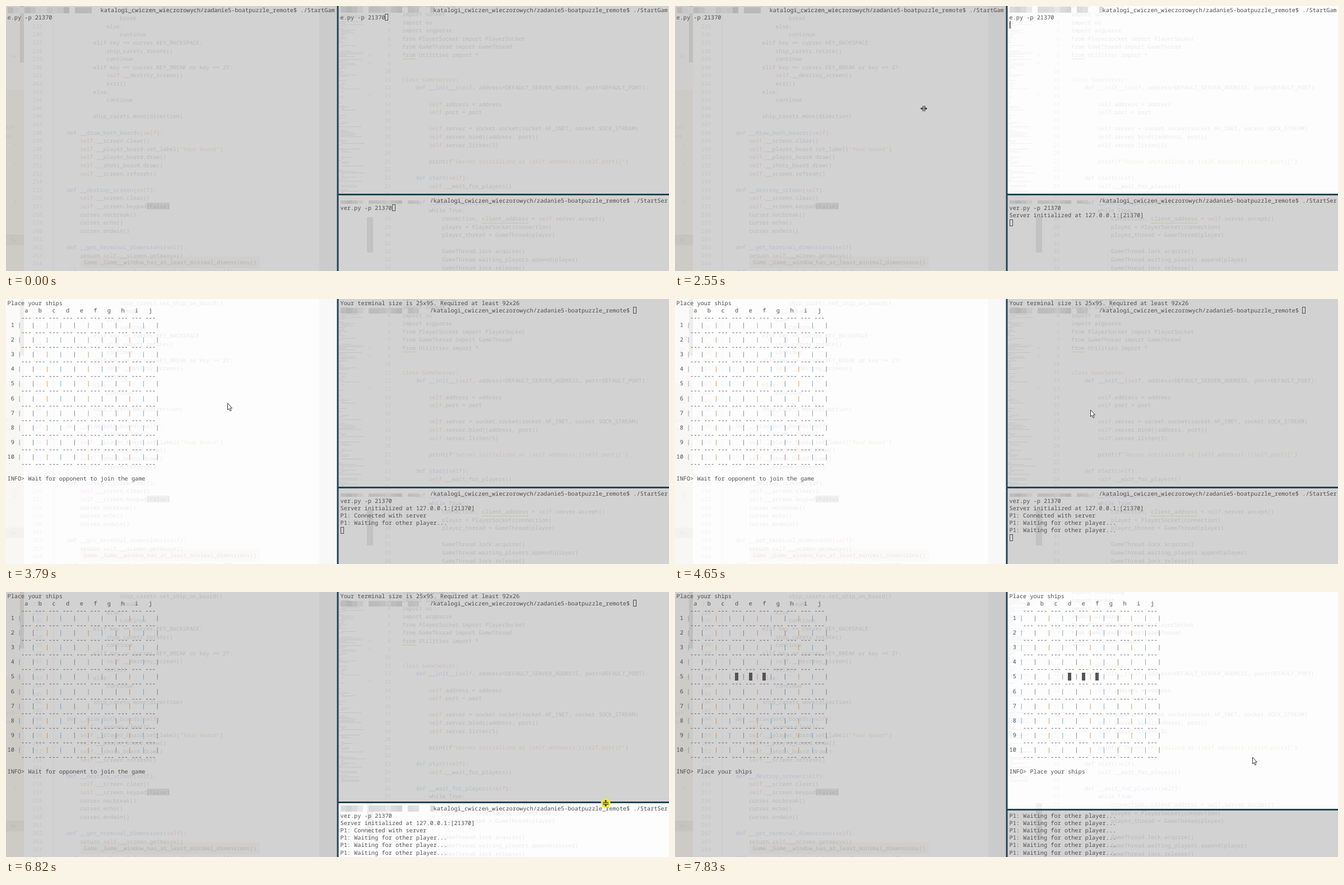
An HTML page with a canvas that plays this animation: 1183x473 px, repeating every 8000 ms.

```html
<!DOCTYPE html>
<html lang="en">
<head>
<meta charset="utf-8">
<title>Terminal game session</title>
<style>
  html, body { margin: 0; width: 100%; height: 100%; overflow: hidden; background: #d2d2d2; }
  canvas { display: block; }
</style>
</head>
<body>
<canvas id="stage" width="1183" height="473"></canvas>
<script>
const ctx = document.getElementById('stage').getContext('2d');
const W = 1183, H = 473, LOOP = 8000;
const COL = 6.15, ROW = 13.08, LEFT = 2.5, RIGHT = 596.5;
const CODE_COL = 5.94, CODE_ROW = 14.6;
const FONT = "px 'Noto Sans Mono', 'DejaVu Sans Mono', monospace";
const INK = '#4e4e4e', DIVIDER = '#1f4555';
const PATH = 'katalogi_cwiczen_wieczorowych/zadanie5-boatpuzzle_remote$ ';
const TAIL = 'e.py -p 21370';

const leftCode = `
                    ship_carets.set_ship_on_board()
                    break
                else:
                    continue
            elif key == curses.KEY_BACKSPACE:
                ship_carets.rotate()
                continue
            elif key == curses.KEY_BREAK or key == 27:
                self.__destroy_screen()
                exit()
            else:
                continue

            ship_carets.move(direction)

    def __draw_both_boards(self):
        self.__screen.clear()
        self.__player_board.set_label("Your board")
        self.__player_board.draw()
        self.__shots_board.draw()
        self.__screen.refresh()

    def __destroy_screen(self):
        self.__screen.clear()
        self.__screen.keypad(False)
        curses.nocbreak()
        curses.echo()
        curses.endwin()

    def __get_terminal_dimensions(self):
        return self.__screen.getmaxyx()

    def __window_has_at_least_minimal_dimensions(self):`.split('\n').slice(1);

const rightCode = `
import threading
import socket
import os
import argparse
from PlayerSocket import PlayerSocket
from GameThread import GameThread
from Utilities import *


class GameServer:
    def __init__(self, address=DEFAULT_SERVER_ADDRESS, port=DEFAULT_PORT):

        self.address = address
        self.port = port

        self.server = socket.socket(socket.AF_INET, socket.SOCK_STREAM)
        self.server.bind((address, port))
        self.server.listen(5)

        print(f"Server initialized at {self.address}:[{self.port}]")

    def start(self):
        self.__wait_for_players()

    def __wait_for_players(self):
        while True:
            connection, client_address = self.server.accept()
            player = PlayerSocket(connection)
            player_thread = GameThread(player)

            GameThread.lock.acquire()
            GameThread.waiting_players.append(player)
            GameThread.lock.release()`.split('\n').slice(1);

// Pointer path: time, x, y
const pointer = [
  [70, 900, 473], [380, 830, 420], [680, 830, 420], [1160, 809, 303], [1460, 767, 172],
  [1550, 775, 180], [2090, 775, 180], [2550, 444, 183], [2700, 444, 183], [2860, 395, 186],
  [4170, 395, 186], [4250, 398, 190], [4480, 398, 190], [4800, 1040, 205], [5030, 1040, 205],
  [5490, 1105, 213], [5720, 1105, 213], [5810, 1138, 213], [6270, 1080, 335], [6610, 1070, 338],
  [6820, 1070, 377], [6950, 1070, 389.5], [7250, 1030, 295]
];
const focusTimes = [[0, ''], [70, 'server'], [1380, 'top'], [2780, 'left'],
  [4700, 'top'], [6610, 'server'], [7250, 'top']];
const blinkStarts = [0, 70, 760, 1090, 2450, 2780, 3160, 4700, 6610, 7250, 7430, 7660];

const rnd = n => { const v = Math.sin(n * 12.9898) * 43758.5453; return v - Math.floor(v); };

function rect(x, y, w, h, color) {
  ctx.fillStyle = color;
  ctx.fillRect(x, y, w, h);
}

function text(s, x, y, color = INK, size = 10.25) {
  ctx.font = size + FONT;
  ctx.fillStyle = color;
  ctx.fillText(s, x, y + 3.5);
}

function codeBlock(lines, x, y, first, numX) {
  lines.forEach((line, i) => {
    const cy = y + i * CODE_ROW;
    ctx.globalAlpha *= .6;
    text(String(first + i).padStart(3), numX, cy, '#444', 9.9);
    ctx.globalAlpha /= .6;
    let col = 0;
    for (const part of line.split(/(\bself\b|def \w+|class \w+|"[^"]*"|\b[A-Z]{4}\w+)/)) {
      const color = part === 'self' ? '#a43c28' : /^def/.test(part) ? '#2840b0'
        : /^class|"/.test(part) ? '#8a6420' : '#303030';
      text(part, x + col * CODE_COL, cy, color, 9.9);
      col += part.length;
    }
  });
}

// The editor seen through the translucent terminals
function backdrop(active) {
  ctx.save();
  ctx.globalAlpha = active ? .09 : .15;
  codeBlock(leftCode, 84.5, 7, 233, 47);
  codeBlock(rightCode, 707, -.2, 2, 669);
  text('Game._Game__window_has_at_least_minimal_dimensions()', 139, 457, '#222', 9.9);

  ctx.globalAlpha = active ? .02 : .035;
  rect(0, 0, 32, H, '#806020');
  rect(0, 150, 32, H - 150, '#806020');
  rect(0, 408, 32, 19, '#000');
  rect(133, 447, 320, 21, '#806020');
  rect(559, 0, 31, H, '#000');
  rect(84, 0, 1, H, '#000');
  ctx.globalAlpha = active ? .05 : .08;
  rect(25, 0, 7, 101, '#000');
  rect(644, 377, 11, 63, '#000');
  rect(251, 351, 41, 12, '#000');
  for (const [s, x, y] of [['9+', 8, 89], ['nash', -6, 215], ['nel', -3, 231],
    ['•', 13, 247], ['•', 13, 282], ['2', 14, 350], ['9+', 8, 417]])
    text(s, x, y, '#604000', 9);
  for (const y of [88, 103, 159]) text('*', 646, y, '#000', 9);
  for (let i = 0; i < 130; i++)
    if (rnd(i + 3) > .25)
      rect(594 + (rnd(i + 40) > .5 ? 4 : 0), 15 + i * 2.5, 4 + rnd(i + 9) ** 2 * 42, 1, '#000');
  ctx.globalAlpha = active ? .2 : .3;
  rect(707, 94, 24, 1, '#c09020');
  rect(849, 387, 83, 1, '#c09020');
  ctx.restore();
}

function mosaic(x, y, w, h, active) {
  for (let i = 0; i * 10 < w; i++) {
    const r = rnd(i + x * .3 + 5);
    if (r < .2) continue;
    const g = Math.round((active ? 248 : 212) - r * (active ? 42 : 34));
    rect(x + i * 10, y, Math.min(10, w - i * 10), h, `rgb(${g},${g},${g})`);
  }
}

function prompt(x, y, cmd, slash, active, maskY = y - 5.5, maskH = 11) {
  const col = slash ? 26 : 27;
  mosaic(Math.round(x), maskY, col * COL, maskH, active);
  text((slash ? '/' : '') + PATH + cmd, x + col * COL, y);
}

function caret(x, y, col, row, active, on) {
  const cx = Math.round(x + col * COL), cy = Math.round(y + row * ROW - 6);
  if (!active) {
    ctx.strokeStyle = INK;
    ctx.strokeRect(cx + .5, cy + .5, 5, 11);
  } else if (on) rect(cx, cy, 1.5, 13, '#333');
}

function board(x, placing, ships) {
  const line = (s, row) => text(s, x, 7 + row * ROW);
  line('Place your ships', 0);
  line('     ' + [...'abcdefghij'].join('   '), 1);
  for (let r = 0; r <= 10; r++) {
    line('    ' + '--- '.repeat(10), 2 + r * 2);
    if (r === 10) break;
    const row = 3 + r * 2;
    line(String(r + 1).padStart(2), row);
    for (let c = 0; c <= 10; c++)
      text('|', x + (3 + c * 4) * COL, 7 + row * ROW, ['#4f8fc4', '#666', '#bd8040'][c % 3]);
  }
  line(placing ? 'INFO> Place your ships' : 'INFO> Wait for opponent to join the game', 24);
  if (ships) for (let c = 3; c < 6; c++)
    rect(Math.round(x + (5 + c * 4) * COL), 144, 6, 14, '#555');
}

function pane(x, y, w, h, active, draw) {
  ctx.save();
  ctx.beginPath();
  ctx.rect(x, y, w, h);
  ctx.clip();
  rect(x, y, w, h, active ? '#fdfdfd' : '#d2d2d2');
  backdrop(active);
  draw(active);
  ctx.restore();
}

function leftPane(t, active, on) {
  if (t >= 3790) return board(LEFT, t >= 7830, t >= 7830);
  prompt(LEFT, 7, './StartGam', false, active, 2);
  text(TAIL, LEFT, 7 + ROW);
  if (active) caret(LEFT, 7, t < 3160 ? 13 : 0, t < 3160 ? 1 : 2, active, on);
}

function topPane(t, active, on) {
  if (t >= 7750) return board(RIGHT, true, t >= 7830);
  if (t < 3240) {
    prompt(RIGHT, 7, './StartGam', false, active, 1);
    text(TAIL, RIGHT, 7 + ROW);
    const entered = t >= 2450;
    caret(RIGHT, 7, entered ? 0 : 13, entered ? 2 : 1, active, on);
  } else if (t >= 3400) {
    const typed = t >= 7430;
    text('Your terminal size is 25x95. Required at least 92x26', RIGHT, 7);
    prompt(RIGHT, 7 + ROW, typed ? './StartGam' : '', true, active, 16, 10);
    if (typed) text(TAIL, RIGHT, 7 + 2 * ROW);
    if (t >= 7660) caret(RIGHT, 7, 0, 3, active, on);
    else caret(RIGHT, 7, typed ? 13 : 85, typed ? 2 : 1, active, on);
  } else caret(RIGHT, 7, 0, 0, active, on);
}

function serverPane(t, split, active, on) {
  const rows = Math.floor((H - split - 2) / ROW);
  const y = 465 - (rows - 1) * ROW - (t >= 6950 ? 4 * ROW : 0);
  const lines = ['', TAIL.replace('e.py', 'ver.py')];
  if (t >= 920) lines.push('Server initialized at 127.0.0.1:[21370]');
  if (t >= 3790) {
    lines.push('P1: Connected with server');
    const count = Math.floor((t - 3720) / 500) + 1;
    for (let i = 0; i < count; i++) lines.push('P1: Waiting for other player...');
  }
  const moved = t >= 6610;
  prompt(RIGHT, y, './StartSer', !moved, active, moved ? y - 5.5 : 347, moved ? 11 : 6);
  lines.forEach((s, i) => text(s, RIGHT, y + i * ROW));
  if (t < 680) caret(RIGHT, y, 15, 1, active, on);
  else caret(RIGHT, y, 0, lines.length, active, on);
}

function shape(points, x, y) {
  ctx.beginPath();
  points.forEach(([px, py]) => ctx.lineTo(x + px, y + py));
  ctx.closePath();
  ctx.lineWidth = 1;
  ctx.fillStyle = '#fff';
  ctx.fill();
  ctx.strokeStyle = '#333';
  ctx.stroke();
}

function resizeIcon(x, y, turn) {
  ctx.save();
  ctx.translate(x, y);
  ctx.rotate(turn);
  rect(-2, -5, 1.2, 10, '#222');
  rect(1, -5, 1.2, 10, '#222');
  for (const s of [-1, 1]) {
    rect(s < 0 ? -5 : 2, -.6, 3, 1.2, '#222');
    ctx.beginPath();
    ctx.moveTo(s * 6, 0);
    ctx.lineTo(s * 3.5, -2.5);
    ctx.lineTo(s * 3.5, 2.5);
    ctx.fill();
  }
  ctx.restore();
}

function pointerAt(t) {
  const i = pointer.findIndex(k => k[0] > t);
  if (i < 0) return pointer[pointer.length - 1].slice(1);
  if (i === 0) return null;
  const [t0, x0, y0] = pointer[i - 1], [t1, x1, y1] = pointer[i];
  const p = (t - t0) / (t1 - t0);
  return [x0 + (x1 - x0) * p, y0 + (y1 - y0) * p];
}

function drawPointer(t, [x, y]) {
  if (t >= 6400 && t < 6950) {
    if (t >= 6610) {
      ctx.fillStyle = '#f0ea35';
      ctx.beginPath();
      ctx.arc(x, y, 8.5, 0, 7);
      ctx.fill();
    }
    resizeIcon(x, y, Math.PI / 2);
  } else if (t > 2300 && t < 2750 && x < 600) resizeIcon(x, y, 0);
  else shape([[.5, 0], [.5, 12], [3, 9.5], [5, 14], [7, 13], [5, 8.8], [8.5, 8.8]], x, y);
}

function render(t) {
  const focus = focusTimes.filter(f => f[0] <= t).pop()[1];
  const since = t - blinkStarts.filter(b => b <= t).pop();
  const on = since % 1200 < 600;
  const mouse = pointerAt(t);
  const split = t < 6610 ? 336.5 : t < 6950 ? mouse[1] - 1.5 : 388;
  ctx.lineWidth = 1;
  pane(0, 0, 591, H, focus === 'left', a => leftPane(t, a, on));
  pane(593, 0, W - 593, split, focus === 'top', a => topPane(t, a, on));
  pane(593, split, W - 593, H - split, focus === 'server', a => serverPane(t, split, a, on));
  rect(590.5, 0, 3, H, DIVIDER);
  rect(591, Math.round(split - 1.5), W - 591, 3, DIVIDER);
  if (mouse) drawPointer(t, mouse);
}

ctx.textRendering = 'geometricPrecision';
const start = performance.now();
function tick() {
  render((performance.now() - start) % LOOP);
  requestAnimationFrame(tick);
}
tick();
</script>
</body>
</html>
```
